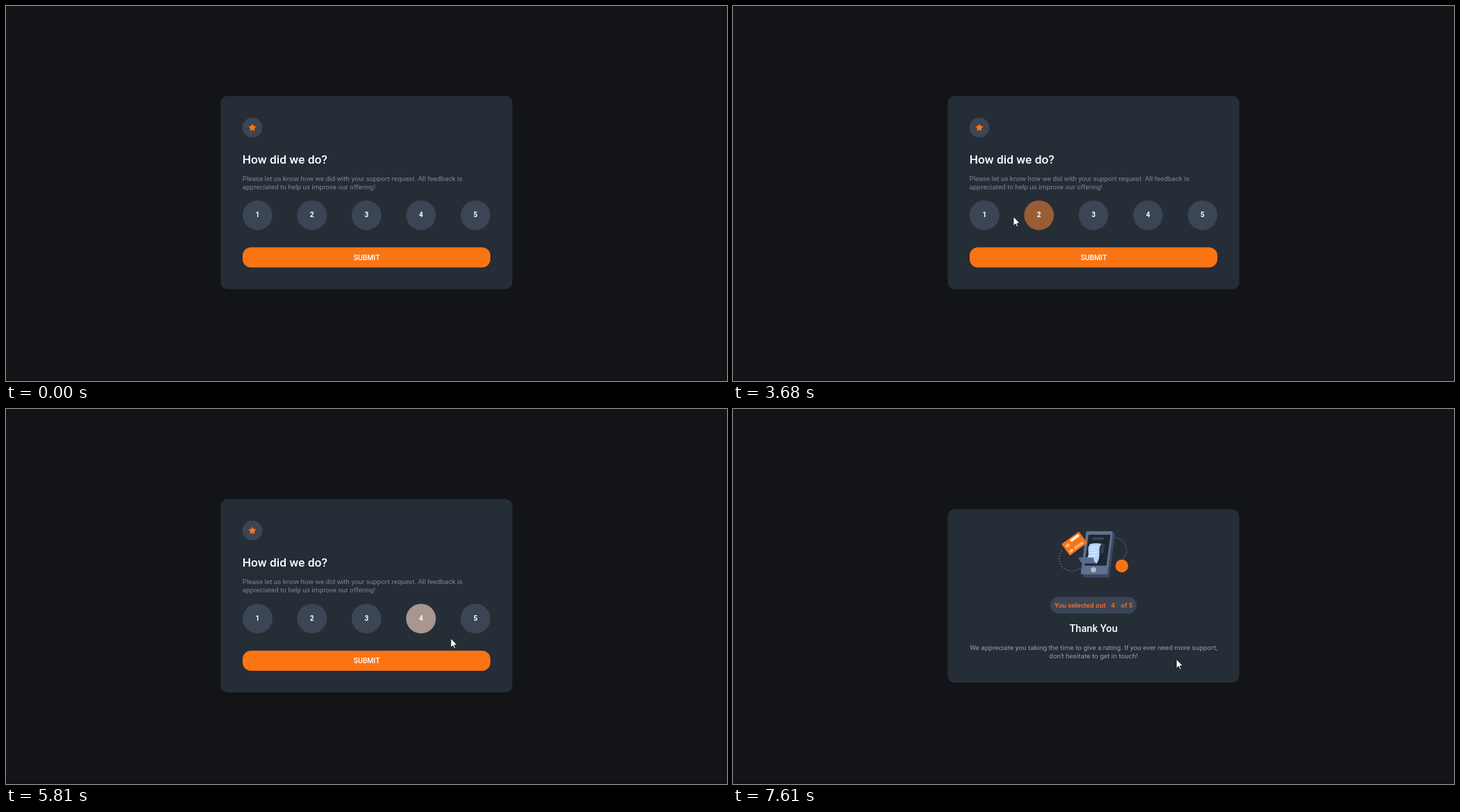
These frames come from a looping animation (1036x540 px, 8 s). An HTML page with a canvas:

```html
<!DOCTYPE html>
<html lang="en">
<head>
<meta charset="utf-8">
<title>Rating card</title>
<style>
html, body { margin: 0; width: 100%; height: 100%; overflow: hidden; background: #121417; }
canvas { display: block; }
</style>
</head>
<body>
<canvas id="stage" width="1036" height="540"></canvas>
<script>
const W = 1036, H = 540, LOOP = 8000, FADE = 500, MID = W / 2;
const ORANGE = [251, 116, 19], SLATE = [59, 69, 84], SILVER = [149, 158, 172], WHITE = [255, 255, 255];
const CARD = '#252d37', MUTED = '#7c8798';
const FONT = 'Roboto, "Open Sans", sans-serif';

const RATINGS = [1, 2, 3, 4, 5], GAP = 78.3, RADIUS = 21.4, ROW = 301.3;
const PRESS = 130, PICK = 5070, SEND = 7120, SWAP_END = 7610;
const picked = t => t >= PICK + PRESS;

const linear = x => x, speedUp = x => x * x, slowDown = x => 1 - (1 - x) ** 2;
const clamp = v => Math.max(0, Math.min(1, v));
const lerp = (a, b, k) => a + (b - a) * k;
const mix = (a, b, k) => a.map((v, i) => lerp(v, b[i], k));
const rgb = c => `rgb(${c.map(Math.round).join()})`;

// Each pointer move starts where the previous one ended.
const START = [1003, 540];
const MOVES = [
  { from: 980, to: 1740, end: [823, 347], pace: speedUp },
  { from: 1740, to: 2580, end: [575, 304], pace: slowDown },
  { from: 2900, to: 3680, end: [403, 303], pace: linear },
  { from: 3680, to: 3880, end: [375, 309], pace: linear },
  { from: 3900, to: 4400, end: [596, 305], pace: speedUp },
  { from: 5480, to: 5810, end: [639, 330], pace: slowDown },
  { from: 6000, to: 6500, end: [637, 360], pace: speedUp }
];

function pointerAt(t) {
  return MOVES.reduce((p, m) => mix(p, m.end, m.pace(clamp((t - m.from) / (m.to - m.from)))), START);
}

// CSS "ease" curve: cubic-bezier(.25, .1, .25, 1).
function ease(x) {
  x = clamp(x);
  if (x === 0 || x === 1) return x;
  let lo = 0, hi = 1;
  for (let i = 0; i < 20; i++) {
    const u = (lo + hi) / 2;
    if (0.75 * u * (1 - u) + u ** 3 < x) lo = u; else hi = u;
  }
  return 0.3 * lo * (1 - lo) ** 2 + 3 * lo * lo * (1 - lo) + lo ** 3;
}

const ratingX = n => MID + (n - 3) * GAP;
const overRating = n => ([x, y]) => Math.hypot(x - ratingX(n), y - ROW) < RADIUS + 0.4;
const overButton = ([x, y]) => Math.abs(x - MID) < 178 && Math.abs(y - 362) < 14.5;

// Finds when the pointer enters and leaves a part.
function visits(isOver) {
  const list = [];
  let inside = false;
  for (let t = 0; t < LOOP; t += 4) {
    const over = isOver(pointerAt(t));
    if (over && !inside) list.push({ enter: t, leave: LOOP });
    if (!over && inside) list[list.length - 1].leave = t;
    inside = over;
  }
  return list;
}

// A fade that is cut short also takes less time to return.
function visitLevel(t, { enter, leave }) {
  if (t <= enter) return 0;
  const level = ease((Math.min(t, leave) - enter) / FADE);
  return t < leave ? level : level * (1 - ease((t - leave) / (FADE * level)));
}

const hoverLevel = (t, list) => Math.max(0, ...list.map(v => visitLevel(t, v)));
const ratingVisits = RATINGS.map(n => visits(overRating(n)));
const buttonVisits = visits(overButton);

function makeLayer() {
  const c = document.createElement('canvas');
  c.width = W;
  c.height = H;
  return c.getContext('2d');
}

function box(g, x, y, w, h, r, fill) {
  g.fillStyle = fill;
  g.beginPath();
  g.roundRect(x, y, w, h, r);
  g.fill();
}

function disc(g, x, y, r, fill) {
  g.fillStyle = fill;
  g.beginPath();
  g.arc(x, y, r, 0, 7);
  g.fill();
}

function shape(g, path, fill) {
  g.fillStyle = fill;
  g.fill(new Path2D(path));
}

function label(g, str, x, y, size, fill, weight = 400, align = 'left') {
  g.font = `${weight} ${size}px ${FONT}`;
  g.textAlign = align;
  g.fillStyle = fill;
  g.fillText(str, x, y);
}

function star(g, x, y) {
  g.beginPath();
  for (let i = 0; i < 10; i++) {
    const a = i * Math.PI / 5 - Math.PI / 2, r = i % 2 ? 2.7 : 5;
    g.lineTo(x + r * Math.cos(a), y + r * Math.sin(a));
  }
  g.closePath();
  g.fillStyle = g.strokeStyle = rgb(ORANGE);
  g.lineJoin = 'round';
  g.lineWidth = 1;
  g.fill();
  g.stroke();
}

function drawForm(g, t) {
  const drop = picked(t) ? 0.5 : 0;
  g.clearRect(0, 0, W, H);
  box(g, 308.4, 129.5, 419.2, 278.3 + drop, 10, CARD);
  disc(g, 354, 175, 14.3, rgb(SLATE));
  star(g, 354, 175.3);
  label(g, 'How did we do?', 339.7, 227.3, 17.3, '#fff', 500);
  label(g, 'Please let us know how we did with your support request. All feedback is', 339.7, 251.7, 9.83, MUTED);
  label(g, 'appreciated to help us improve our offering!', 339.7, 264.2, 9.9, MUTED);

  RATINGS.forEach((n, i) => {
    const base = n === 4 && picked(t) ? SILVER : SLATE;
    const level = hoverLevel(t, ratingVisits[i]);
    disc(g, ratingX(n), ROW + drop, RADIUS, rgb(mix(base, ORANGE, level)));
    label(g, n, ratingX(n), 304.3 + drop, 10, '#fff', 700, 'center');
  });

  const k = hoverLevel(t, buttonVisits);
  box(g, 340, 347.5 + drop, 356, 29, 12, rgb(mix(ORANGE, WHITE, k)));
  label(g, 'SUBMIT', MID + 0.3, 366.2, 10.4, rgb(mix(WHITE, [214, 98, 42], k)), 500, 'center');
}

function dots(g, x, y, r, from, to) {
  g.strokeStyle = '#a7b0bf';
  g.lineWidth = 1.2;
  g.lineCap = 'round';
  g.setLineDash([0.1, 3.9]);
  g.beginPath();
  g.arc(x, y, r, from, to);
  g.stroke();
  g.setLineDash([]);
}

function drawPhone(g) {
  g.save();
  g.transform(1, 0, -0.13, 1, 507.5, 176);
  box(g, 4, 3, 38, 63.5, 2, '#3c4862');
  box(g, 0, 0, 38.5, 62, 1.5, '#61708f');
  box(g, 4, 5, 31.5, 44.5, 0.5, '#1f2632');
  box(g, 10, 9, 16.5, 3.5, 0, '#3b4554');
  box(g, 24, 18, 5, 14, 0, '#303b4c');
  g.restore();
  disc(g, 518, 231.5, 3.8, '#b0bccd');
}

function drawReceipt(g) {
  shape(g, 'M496.5 213.5H518Q519 221 525 222.5H504Q498 221 496.5 213.5', '#566d8d');
  shape(g, 'M513 194.5Q520 192.5 529.5 194Q526 198 526.5 206Q527 217 522.5 222.5' +
    'Q518 220 518 214H509.5Q511.5 209 510.5 204Q510 198 513 194.5', '#b6d3fa');
  g.strokeStyle = '#eaf3ff';
  g.lineWidth = 1;
  for (let y = 199.5; y < 213; y += 4) {
    g.beginPath();
    g.moveTo(513.5, y);
    g.lineTo(523.5, y - 1.5);
    g.stroke();
  }
}

function drawBankCard(g) {
  g.save();
  g.translate(490.5, 193.8);
  g.rotate(-0.63);
  box(g, -15.5, -10.2, 31, 20.4, 1, rgb(ORANGE));
  box(g, -2, -8, 14.5, 3.8, 0.5, '#fff');
  box(g, -12.5, -5.5, 6, 4, 0.5, '#ffb680');
  box(g, -12.5, 4, 6, 3.5, 0.5, '#ffc699');
  box(g, -4, 4, 15, 3.5, 0.5, '#ffb680');
  g.restore();
}

function drawThanks(g) {
  const tint = '#fb6f2c';
  g.clearRect(0, 0, W, H);
  box(g, 308.4, 144.3, 419.2, 249.6, 10, CARD);
  dots(g, 487, 215, 18.3, 0.9, 3.9);
  dots(g, 547, 203, 18.3, -1.5, 0.8);
  drawPhone(g);
  drawReceipt(g);
  drawBankCard(g);
  disc(g, 558.7, 226, 9.2, rgb(ORANGE));
  box(g, 456, 270.8, 124, 23.6, 11.8, rgb(SLATE));
  label(g, 'You selected out', 462, 285.8, 9.85, tint, 500);
  label(g, '4', 546, 285.8, 9.85, tint, 500, 'center');
  label(g, 'of 5', 557.3, 285.8, 9.85, tint, 500);
  label(g, 'Thank You', MID, 320.7, 14.6, '#fff', 500, 'center');
  label(g, 'We appreciate you taking the time to give a rating. If you ever need more support,', MID, 346.9, 9.95, rgb(SILVER), 400, 'center');
  label(g, 'don\'t hesitate to get in touch!', MID, 359.3, 9.95, rgb(SILVER), 400, 'center');
}

const ARROW = new Path2D('M0 0V13.6L3.2 10.8L5.2 15.3L7.2 14.4L5.2 10H9.5Z');
const HAND = new Path2D('M-.5 2Q1 -.4 2.5 2V6.5Q4 5.5 5.2 7Q6.6 6 7.6 7.7Q9.2 7 10 8.7V12.5' +
  'Q10 14.5 8.5 16.5V18.5H.2V17Q-2 14.5 -4.3 11Q-4.3 8.7 -2 9.8L-.5 11.4Z');
const KNUCKLES = new Path2D('M2.5 6.5V9.5M5.2 7.2V9.7M7.6 8V10');

function drawPointer(g, t) {
  if (t < MOVES[0].from) return;
  const spot = pointerAt(t);
  const hand = RATINGS.some(n => overRating(n)(spot)) || (t < SEND + PRESS && overButton(spot));
  g.save();
  g.translate(...spot);
  if ([PICK, SEND].some(p => t >= p && t < p + PRESS)) disc(g, 0, 0.7, 9.3, 'rgba(255,250,0,.52)');
  g.fillStyle = '#fff';
  g.strokeStyle = '#111';
  g.lineWidth = 1;
  g.lineJoin = 'round';
  g.fill(hand ? HAND : ARROW);
  g.stroke(hand ? HAND : ARROW);
  if (hand) g.stroke(KNUCKLES);
  g.restore();
}

const stage = document.getElementById('stage').getContext('2d');
const form = makeLayer(), thanks = makeLayer();
drawThanks(thanks);

function draw(t) {
  const swapStart = SEND + PRESS;
  const swap = ease((t - swapStart) / (SWAP_END - swapStart));
  stage.fillStyle = '#121417';
  stage.fillRect(0, 0, W, H);
  stage.fillStyle = '#0f1013';
  stage.fillRect(0, H - 2, W, 2);
  drawForm(form, t);
  stage.globalAlpha = 1 - swap;
  stage.drawImage(form.canvas, 0, 0);
  stage.globalAlpha = swap;
  stage.drawImage(thanks.canvas, 0, 0);
  stage.globalAlpha = 1;
  drawPointer(stage, t);
}

const begin = performance.now();
function tick() {
  draw((performance.now() - begin) % LOOP);
  requestAnimationFrame(tick);
}
tick();
</script>
</body>
</html>
```
